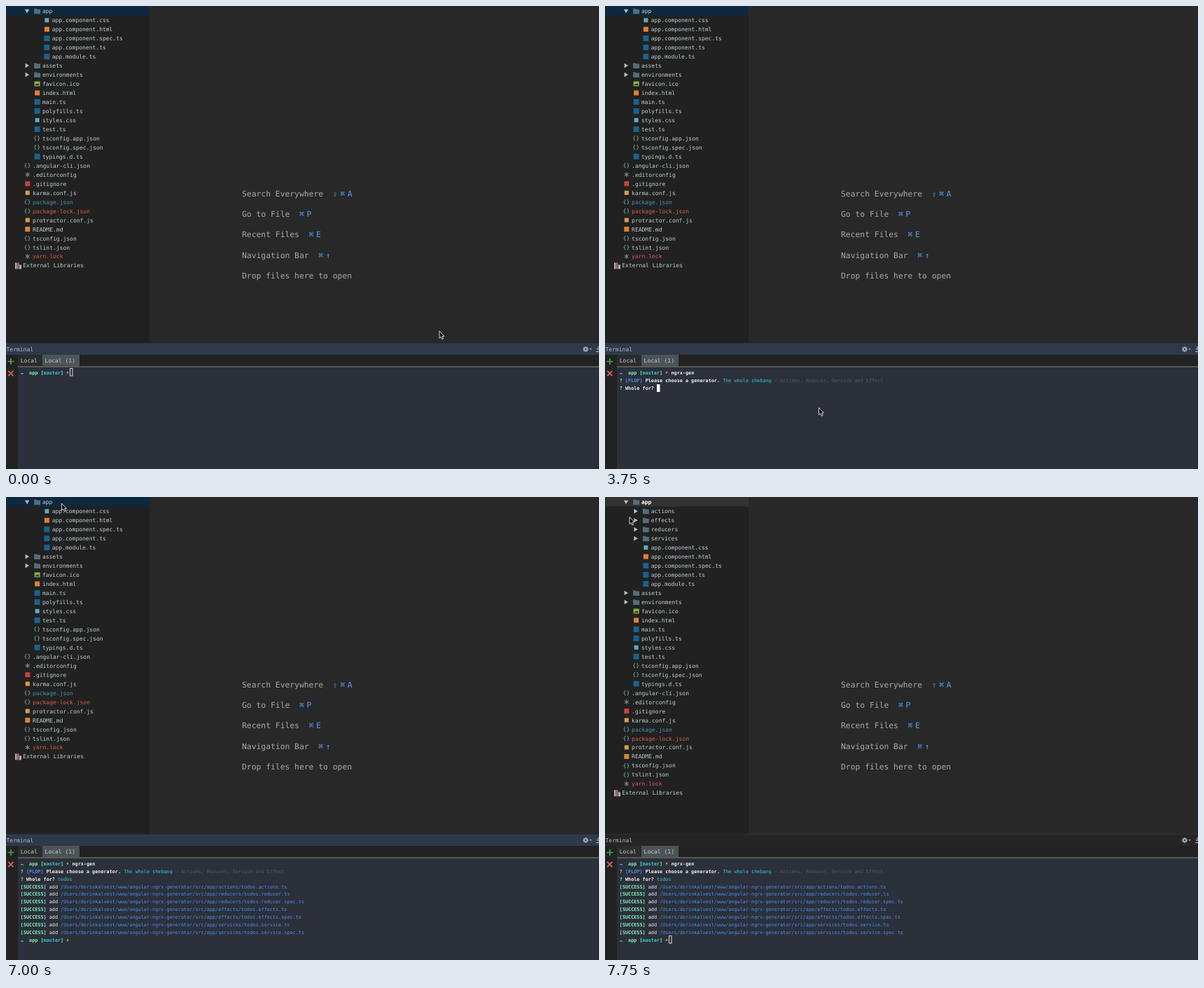
Write an HTML page with a canvas that moves like this. It is 847 by 661 pixels and loops after 8000 ms.

```html
<!DOCTYPE html>
<html lang="en">
<head>
<meta charset="utf-8">
<title>Generator in the IDE terminal</title>
<style>
  html, body { margin: 0; width: 100%; height: 100%; overflow: hidden; background: #282828; }
  canvas { display: block; }
</style>
</head>
<body>
<canvas id="stage" width="847" height="661"></canvas>
<script>
const ctx = document.getElementById('stage').getContext('2d');
const LOOP = 8000;
const PLAIN = '#c3ced2', BLUE = '#4d92ae', RED = '#d95f4b';
const WHITE = '#f0f2f3', MINT = '#80efb4', CYAN = '#35cdd3', LINK = '#4c8feb', DIM = '#555b65';

// Each row: depth, icon, name, colour
const treeTop = [[1, 'open', 'app']];
const newFolders = ['actions', 'effects', 'reducers', 'services'].map(name => [2, 'shut', name]);
const treeRest = [
  [2, 'css', 'app.component.css'], [2, 'html', 'app.component.html'],
  [2, 'ts', 'app.component.spec.ts'], [2, 'ts', 'app.component.ts'], [2, 'ts', 'app.module.ts'],
  [1, 'shut', 'assets'], [1, 'shut', 'environments'],
  [1, 'image', 'favicon.ico'], [1, 'html', 'index.html'],
  [1, 'ts', 'main.ts'], [1, 'ts', 'polyfills.ts'], [1, 'css', 'styles.css'], [1, 'ts', 'test.ts'],
  [1, 'json', 'tsconfig.app.json'], [1, 'json', 'tsconfig.spec.json'], [1, 'ts', 'typings.d.ts'],
  [0, 'json', '.angular-cli.json'], [0, 'star', '.editorconfig'], [0, 'git', '.gitignore'],
  [0, 'js', 'karma.conf.js'], [0, 'json', 'package.json', BLUE],
  [0, 'json', 'package-lock.json', RED], [0, 'js', 'protractor.conf.js'], [0, 'md', 'README.md'],
  [0, 'json', 'tsconfig.json'], [0, 'json', 'tslint.json'], [0, 'star', 'yarn.lock', RED],
  [-1, 'library', 'External Libraries'],
];
const badges = { css: ['#62a9c4', 6], html: ['#dd8138', 7], ts: ['#1a628f', 8], git: ['#c9403d', 7], js: ['#dd9c45', 6], md: ['#d98536', 7] };

// Time, x, y of the pointer tip
const pointerPath = [
  [0, 619, 464], [250, 418.5, 632.5], [500, 353.5, 602.5], [750, 312.5, 574.5], [1000, 305.5, 573.5],
  [5750, 396.5, 573.5], [6000, 283.5, 152.5], [6250, 281.5, 142.5], [6500, 91, 47.5],
  [6750, 69, 20.5], [7000, 79.5, 9], [7250, 80, 9.5], [7500, 60.5, 18], [7750, 35, 28.5],
];
// Time, column, line, style of the terminal caret
const caretPath = [
  [0, 17, 0, 'hollow'], [1000, 18, 0, 'block'], [2000, 25, 0, 'block'], [2500, 26, 0, 'block'],
  [2750, 0, 1, 'block'], [3250, 0, 0, 'none'], [3750, 13, 2, 'block'], [4500, 15, 2, 'block'],
  [4750, 17, 2, 'block'], [5000, 18, 2, 'block'], [5250, 18, 10, 'block'], [5750, 18, 10, 'none'],
  [6500, 18, 10, 'block'], [7000, 18, 10, 'none'], [7250, 17, 10, 'hollow'],
];
const commandSteps = [[0, ''], [2000, 'ngrx-ge'], [2500, 'ngrx-gen']];
const answerSteps = [[0, ''], [4500, 'to'], [4750, 'todo'], [5000, 'todos']];
const generated = ['actions/todos.actions', 'reducers/todos.reducer', 'reducers/todos.reducer.spec',
  'effects/todos.effects', 'effects/todos.effects.spec', 'services/todos.service', 'services/todos.service.spec'];

const at = (steps, t) => steps.filter(s => s[0] <= t).pop();

function rect(x, y, w, h, color) {
  ctx.fillStyle = color;
  ctx.fillRect(x, y, w, h);
}

function text(str, x, y, color, size = 8, bold = false) {
  ctx.font = `${bold ? 'bold ' : ''}${size}px "DejaVu Sans Mono", monospace`;
  ctx.fillStyle = color;
  ctx.fillText(str, x, y);
}

function shape(points, color) {
  ctx.beginPath();
  points.forEach(([x, y]) => ctx.lineTo(x, y));
  ctx.closePath();
  ctx.fillStyle = color;
  ctx.fill();
}

function strokes(color, width, ...lines) {
  ctx.beginPath();
  for (const [x1, y1, x2, y2] of lines) {
    ctx.moveTo(x1, y1);
    ctx.lineTo(x2, y2);
  }
  ctx.strokeStyle = color;
  ctx.lineWidth = width;
  ctx.stroke();
}

function circle(x, y, r, color) {
  ctx.beginPath();
  ctx.arc(x, y, r, 0, 7);
  ctx.fillStyle = color;
  ctx.fill();
}

function drawIcon(kind, x, y) {
  if (badges[kind]) {
    const [color, size] = badges[kind];
    rect(x - size / 2, y - size / 2, size, size, color);
  } else if (kind === 'json') {
    text('{', x - 5, y + 2.6, '#8ccdb5', 7.5);
    text('}', x, y + 2.6, '#8ccdb5', 7.5);
  } else if (kind === 'star') {
    strokes('#8c9a9f', 1, [x, y - 3.5, x, y + 3.5], [x - 3, y - 1.8, x + 3, y + 1.8], [x - 3, y + 1.8, x + 3, y - 1.8]);
  } else if (kind === 'image') {
    rect(x - 4, y - 3.5, 8, 7, '#8fb04a');
    shape([[x - 3, y + 2.3], [x - 1, y - 0.5], [x, y + 0.8], [x + 1.3, y - 1], [x + 3, y + 2.3]], '#2d3a1c');
  } else if (kind === 'library') {
    rect(x - 4, y - 4, 2.5, 9, '#a8b0b3');
    rect(x - 1, y - 4, 2.5, 9, '#b5685c');
    rect(x + 2, y - 1, 3, 6, '#aab4b8');
  } else {
    shape([[x - 4.5, y - 3.5], [x - 1, y - 3.5], [x, y - 2.5], [x + 4.5, y - 2.5], [x + 4.5, y + 4], [x - 4.5, y + 4]], '#546e7a');
    const ax = x - 14.5;
    shape(kind === 'open'
      ? [[ax - 3.3, y - 2.5], [ax + 3.3, y - 2.5], [ax, y + 3]]
      : [[ax - 2.5, y - 3.3], [ax + 3, y], [ax - 2.5, y + 3.3]], '#b4bbbe');
  }
}

function drawTree(t) {
  const active = t < 7250;
  rect(0, 0, 205, 482, '#212121');
  rect(0, 0, 205, 13.5, active ? '#0d293e' : '#323232');
  const rows = [...treeTop, ...(t >= 7750 ? newFolders : []), ...treeRest];
  rows.forEach(([depth, icon, name, color = PLAIN], i) => {
    const x = 38.1 + 13.8 * depth, y = 7.3 + 12.97 * i;
    drawIcon(icon, x - 7.3, y);
    const picked = i === 0 && !active;
    text(name, x, y + 3, picked ? '#ffffff' : color, 8, picked);
  });
}

function drawEditor(t) {
  rect(205, 0, 642, 482, '#282828');
  const hints = [['Search Everywhere', '⇧⌘A'], ['Go to File', '⌘P'], ['Recent Files', '⌘E'], ['Navigation Bar', '⌘↑'], ['Drop files here to open', '']];
  hints.forEach(([label, keys], i) => {
    const y = 271.6 + 29.3 * i;
    text(label, 337, y, '#a8a8a8', 11.35);
    let x = 337 + (label.length + 2) * 6.83;
    for (const key of keys) {
      text(key, x, y, '#569cf2', 11.35);
      x += key === '⌘' || key === '⇧' ? 10.5 : 7;
    }
  });
  if (t >= 7250 && t < 7750) drawProgress(t);
}

function drawProgress(t) {
  ctx.save();
  ctx.beginPath();
  ctx.rect(669, 458, 151, 5);
  ctx.clip();
  for (let x = 664 + (t >= 7500 ? 5 : 0); x < 822; x += 11.1) {
    shape([[x + 4, 458], [x + 9, 458], [x + 5, 463], [x, 463]], '#646464');
  }
  ctx.restore();
  circle(834, 460.5, 4.3, '#874a48');
  strokes('#2b2b2b', 1, [832.2, 458.7, 835.8, 462.3], [832.2, 462.3, 835.8, 458.7]);
}

function drawPanel(t) {
  rect(0, 481, 847, 17, t < 7500 ? '#2e3a4b' : '#252525');
  rect(0, 481, 847, 1, t < 7500 ? '#283240' : '#323232');
  text('Terminal', 0.5, 492.6, '#b3babf');
  for (let i = 0; i < 4; i++) {
    const dx = 4 * Math.cos(i * Math.PI / 4), dy = 4 * Math.sin(i * Math.PI / 4);
    strokes('#a7adb1', 1.5, [828 - dx, 490 - dy, 828 + dx, 490 + dy]);
  }
  circle(828, 490, 2.8, '#a7adb1');
  circle(828, 490, 1.2, '#303845');
  shape([[833, 489], [837, 489], [835, 491]], '#a7adb1');
  strokes('#b3babf', 1, [846, 486, 846, 491], [843.5, 489, 846, 491.5], [843, 493.5, 847, 493.5]);

  rect(0, 498, 847, 163, '#222222');
  rect(17, 498, 35, 16, '#2a2c2d');
  rect(52, 498, 53, 17, '#4b5457');
  text('Local', 20.8, 509, '#c5cbce');
  text('Local (1)', 55.6, 509, '#c5cbce');
  rect(17, 514, 830, 2, '#57594f');
  rect(17, 516, 829, 145, '#2b303b');
  strokes('#45a653', 1.7, [2.5, 507.5, 11.5, 507.5], [7, 503, 7, 512]);
  strokes('#db6350', 1.7, [3.2, 520.8, 10.5, 528.2], [3.2, 528.2, 10.5, 520.8]);
}

const cellX = col => 20.8 + 4.094 * col;
const lineY = line => 523.3 + 10.92 * line;

// Spans: [colour, text, bold]
function print(line, spans) {
  let col = 0;
  for (const [color, str, bold] of spans) {
    text(str, cellX(col), lineY(line) + 2.5, color, 6.8, bold);
    col += str.length;
  }
}

function prompt(line, command) {
  const x = cellX(16), y = lineY(line);
  rect(21, y + 0.8, 4, 1.4, '#4fa9b5');
  shape([[x + 2.4, y - 2.6], [x, y + 0.7], [x + 1.6, y + 0.7], [x + 0.6, y + 3], [x + 3.6, y - 0.6], [x + 2, y - 0.6]], '#d6ae3c');
  print(line, [['', '   '], [MINT, 'app ', true], [MINT, '[', true], [CYAN, 'master', true], [MINT, ']', true], ['', '   '], [WHITE, command, true]]);
}

function drawTerminal(t) {
  prompt(0, at(commandSteps, t)[1]);
  const question = [[MINT, '? ', true], [LINK, '[PLOP] ', true], [WHITE, 'Please choose a generator. ', true]];
  const detail = 'Actions, Reducer, Service and Effect';
  if (t >= 3250 && t < 3750) {
    print(1, [...question, [DIM, '(Use arrow keys)']]);
    print(2, [[CYAN, '❯ The whole shebang — ' + detail]]);
    ['Actions', 'Reducer', 'Service', 'Effect'].forEach((name, i) => print(3 + i, [[WHITE, '  ' + name]]));
  }
  if (t >= 3750) {
    print(1, [...question, [CYAN, 'The whole shebang'], [DIM, ' — ' + detail]]);
    print(2, [[MINT, '? ', true], [WHITE, 'Whole for? ', true], [t < 5250 ? WHITE : CYAN, at(answerSteps, t)[1]]]);
  }
  if (t >= 5250) {
    generated.forEach((file, i) => print(3 + i, [[MINT, '[SUCCESS] ', true], [WHITE, 'add '],
      [LINK, `/Users/dorinkalvest/www/angular-ngrx-generator/src/app/${file}.ts`]]));
    prompt(10, '');
  }
  const [, col, line, style] = at(caretPath, t);
  const x = Math.floor(cellX(col)), y = Math.round(lineY(line) - 5.5);
  if (style === 'block') rect(x, y, 4.5, 11, '#f7f7f7');
  if (style === 'hollow') {
    ctx.strokeStyle = '#d5d8dc';
    ctx.lineWidth = 1;
    ctx.strokeRect(x + 1.5, y - 0.5, 3.5, 10.5);
  }
}

function drawPointer(t) {
  const [, x, y] = at(pointerPath, t);
  shape([[0, 0], [0, 10.3], [2.3, 8.2], [3.9, 11.8], [5.6, 11], [4.1, 7.5], [7, 7.4]].map(([dx, dy]) => [x + dx, y + dy]), '#101010');
  ctx.strokeStyle = '#e8e8e8';
  ctx.lineWidth = 0.9;
  ctx.stroke();
}

function frame(now) {
  const t = now % LOOP;
  ctx.textRendering = 'geometricPrecision';
  for (const draw of [drawTree, drawEditor, drawPanel, drawTerminal, drawPointer]) draw(t);
  requestAnimationFrame(frame);
}
requestAnimationFrame(frame);
</script>
</body>
</html>
```
